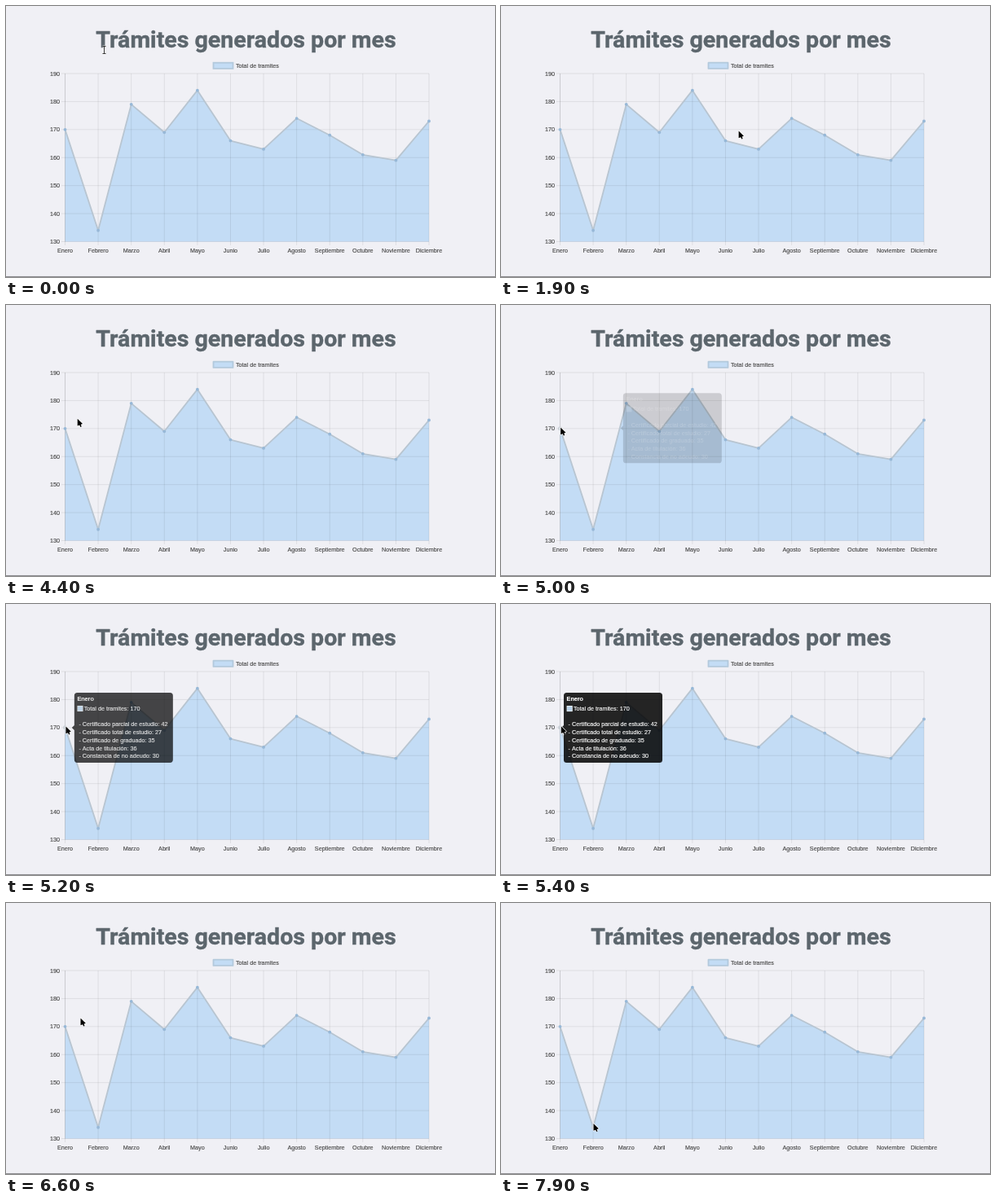
Recreate the animation shown at these times as an HTML page with a canvas. Size 600 by 333 pixels, loop 8000 ms.

```html
<!DOCTYPE html>
<html lang="es">
<head>
<meta charset="utf-8">
<title>Trámites generados por mes</title>
<style>
  html, body { margin: 0; width: 100%; height: 100%; overflow: hidden; background: #f0f0f5; }
  canvas { display: block; width: 600px; height: 333px; }
</style>
</head>
<body>
<canvas id="stage" width="600" height="333"></canvas>
<script>
const ctx = document.getElementById('stage').getContext('2d');
const LOOP = 8000, STEP = 100;
const SIZE = 7.2;
const LABEL_FONT = `${SIZE}px "Liberation Sans", Arial, sans-serif`;
const INK = '#484848', LINE = '#b8c5d1', FILL = '#c3dcf5';

const plot = { left: 72.5, right: 519, top: 83, bottom: 289.5, min: 130, max: 190 };
const totals = {
  Enero: 170, Febrero: 134, Marzo: 179, Abril: 169, Mayo: 184, Junio: 166, Julio: 163,
  Agosto: 174, Septiembre: 168, Octubre: 161, Noviembre: 159, Diciembre: 173
};
const months = Object.keys(totals);
const details = ['Certificado parcial de estudio: 42', 'Certificado total de estudio: 27',
  'Certificado de graduado: 35', 'Acta de titulación: 36', 'Constancia de no adeudo: 30'];

const tooltip = { x: 77, y: 109, w: 121, h: 86, show: 4948, hide: 6300, slideFrom: 113 };

// Stops the pointer eases between
const stops = [
  { t: 1000, x: 120, y: 54 }, { t: 2100, x: 308, y: 163 }, { t: 3400, x: 249, y: 67.5 },
  { t: 3700, x: 141, y: 101 }, { t: 4700, x: 73, y: 150.5 }, { t: 6300, x: 75, y: 150 },
  { t: 6600, x: 91.5, y: 141.5 }, { t: 7100, x: 96, y: 161 }, { t: 7400, x: 113.5, y: 271 }
];

const clamp = v => Math.min(1, Math.max(0, v));
const smooth = p => p * p * (3 - 2 * p);
const mix = (a, b, p) => a + (b - a) * p;
const xAt = i => mix(plot.left, plot.right, i / (months.length - 1));
const yAt = v => mix(plot.bottom, plot.top, (v - plot.min) / (plot.max - plot.min));

// A hairline outline gives the text a slightly heavier weight
function text(str, x, y, font, color, align = 'left', weight = 0.15) {
  ctx.font = font;
  ctx.fillStyle = ctx.strokeStyle = color;
  ctx.lineWidth = weight;
  ctx.textAlign = align;
  ctx.fillText(str, x, y);
  ctx.strokeText(str, x, y);
}

function trace(points) {
  ctx.beginPath();
  points.forEach(([x, y]) => ctx.lineTo(x, y));
}

function rule(x1, y1, x2, y2) {
  trace([[x1, y1], [x2, y2]]);
  ctx.stroke();
}

function dot(x, y, r, color) {
  ctx.fillStyle = color;
  ctx.beginPath();
  ctx.arc(x, y, r, 0, Math.PI * 2);
  ctx.fill();
}

function drawPage() {
  ctx.fillStyle = '#f0f0f5';
  ctx.fillRect(0, 0, 600, 333);
  ctx.fillStyle = '#8e8e91';
  ctx.fillRect(0, 332, 600, 1);
  text('Trámites generados por mes', 294.5, 51, 'bold 28.55px Roboto, sans-serif',
    '#5c666d', 'center', 0.4);

  ctx.fillStyle = FILL;
  ctx.fillRect(254.5, 69.7, 24, 7.2);
  ctx.strokeStyle = '#b3c9dc';
  ctx.lineWidth = 1.8;
  ctx.strokeRect(254.5, 69.7, 24, 7.2);
  text('Total de tramites', 282, 75.9, LABEL_FONT, INK);
}

function drawGrid() {
  const gridLine = (...ends) => {
    ctx.strokeStyle = 'rgba(0,0,0,.08)';
    ctx.lineWidth = 1;
    rule(...ends);
  };
  months.forEach((name, i) => {
    const x = xAt(i);
    gridLine(x, plot.top, x, plot.bottom + 4.5);
    text(name, x, 302.6, LABEL_FONT, INK, 'center');
  });
  for (let v = plot.min; v <= plot.max; v += 10) {
    const y = yAt(v);
    gridLine(plot.left - 4.5, y, plot.right, y);
    text(v, 66, y + 2.5, LABEL_FONT, INK, 'right');
  }
  gridLine(plot.left, plot.top, plot.left, plot.bottom);
}

function drawChart(hovered) {
  const points = months.map((name, i) => [xAt(i), yAt(totals[name])]);
  trace([...points, [plot.right, plot.bottom], [plot.left, plot.bottom]]);
  ctx.fillStyle = FILL;
  ctx.fill();
  drawGrid();

  trace(points);
  ctx.strokeStyle = LINE;
  ctx.lineWidth = 1.8;
  ctx.lineJoin = 'round';
  ctx.stroke();
  points.forEach(([x, y], i) =>
    months[i] === hovered ? dot(x, y, 2.5, '#cbd1d8') : dot(x, y, 1.9, '#97b8d7'));
}

function drawTooltip(t) {
  const { w, h, show, hide, slideFrom } = tooltip;
  const alpha = clamp((t - show) / 300) * clamp((hide + 200 - t) / 200);
  if (!alpha) return;
  const rest = (1 - clamp((t - show) / 500)) ** 4;
  const x = tooltip.x + slideFrom * rest, y = tooltip.y - rest;
  const middle = y + h / 2;

  ctx.save();
  ctx.globalAlpha = alpha;
  ctx.fillStyle = 'rgba(0,0,0,.85)';
  ctx.beginPath();
  ctx.roundRect(x, y, w, h, 3.6);
  ctx.moveTo(x, middle - 3);
  ctx.lineTo(x - 3, middle);
  ctx.lineTo(x, middle + 3);
  ctx.fill();

  text('Enero', x + 3.6, y + 10.1, `bold ${LABEL_FONT}`, '#fff');
  ctx.fillStyle = '#fff';
  ctx.fillRect(x + 3.6, y + 16, 7.1, 7.1);
  ctx.fillStyle = '#b9d2e9';
  ctx.fillRect(x + 4.2, y + 16.6, 5.9, 5.9);
  text(`Total de tramites: ${totals.Enero}`, x + 11.9, y + 22, LABEL_FONT, '#fff');
  details.forEach((line, i) =>
    text('- ' + line, x + 5.6, y + 41.5 + i * 9.73, LABEL_FONT, '#fff'));
  ctx.restore();
}

function pointerAt(t) {
  const next = stops.findIndex(stop => stop.t > t);
  if (next === 0) return stops[0];
  if (next < 0) return stops[stops.length - 1];
  const a = stops[next - 1], b = stops[next];
  const p = smooth((t - a.t) / (b.t - a.t));
  return { x: mix(a.x, b.x, p), y: mix(a.y, b.y, p) };
}

function drawBeam(color, width) {
  ctx.strokeStyle = color;
  ctx.lineWidth = width;
  rule(0.5, -4, 0.5, 4);
  for (const y of [-4.5, 4.5]) rule(-1.5, y, 2.5, y);
}

function drawArrow(color, grow) {
  ctx.fillStyle = ctx.strokeStyle = color;
  ctx.lineWidth = 1.6 + grow;
  rule(2.5, 5.5, 4.3, 9.8);
  trace([[0, 0], [0, 8.8], [6.3, 6.3]]);
  ctx.closePath();
  ctx.fill();
  ctx.lineWidth = grow;
  if (grow) ctx.stroke();
}

function drawPointer(t) {
  const { x, y } = pointerAt(t);
  const overTitle = y < 62;
  ctx.save();
  ctx.translate(x, y);
  if (overTitle) {
    drawBeam('rgba(255,255,255,.8)', 2);
    drawBeam('#222', 0.9);
  } else {
    drawArrow('#fff', 1.3);
    drawArrow('#000', 0);
  }
  ctx.restore();
}

function hoveredMonth(t) {
  if (t >= 4900 && t < 6400) return 'Enero';
  return t >= 7900 ? 'Febrero' : null;
}

let start;
function loop(now) {
  start ??= now;
  const t = Math.floor((now - start) % LOOP / STEP) * STEP;
  drawPage();
  drawChart(hoveredMonth(t));
  drawTooltip(t);
  drawPointer(t);
  requestAnimationFrame(loop);
}
requestAnimationFrame(loop);
</script>
</body>
</html>
```
